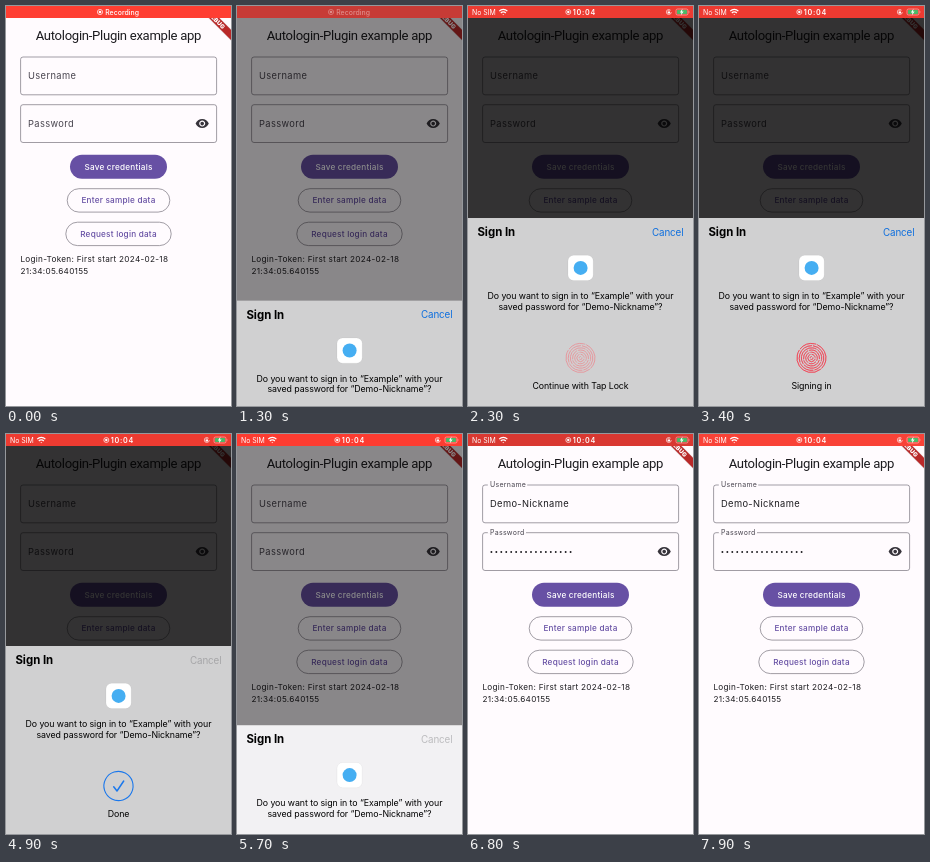
An HTML page that plays this animation: 225x400 px, repeating every 8000 ms.

```html
<!DOCTYPE html>
<html lang="en">
<head>
<meta charset="utf-8">
<title>Autologin demo</title>
<style>
  html, body { margin: 0; width: 100%; height: 100%; overflow: hidden; background: #fffbfe; }
  svg { display: block; width: 100vw; height: 100vh; }
  text { font-family: Inter, "Open Sans", sans-serif; white-space: pre; }
  .mid { text-anchor: middle; }
  .title { font: 13.1px Roboto, sans-serif; letter-spacing: -.29px; fill: #1c1b1f; }
  .field { fill: none; stroke: #79747e; stroke-width: .7; }
  .label { font-size: 9.3px; letter-spacing: .38px; fill: #49454f; }
  .value { font-size: 9.3px; letter-spacing: .38px; fill: #1c1b1f; }
  .btn { font-size: 8.2px; font-weight: 500; letter-spacing: .22px; fill: #6750a4; }
  .line { fill: none; stroke: #79747e; stroke-width: .7; }
  .token { font-size: 8.2px; letter-spacing: .28px; fill: #1c1b1f; }
  .bar { font-size: 6.9px; fill: #fff; }
  .head { font-size: 11.4px; font-weight: 700; fill: #000; }
  .cancel { font-size: 9.8px; letter-spacing: -.1px; text-anchor: end; }
  .body { font-size: 8.8px; letter-spacing: -.07px; fill: #000; text-anchor: middle; }
  .print circle { fill: none; stroke-width: .85; stroke-linecap: round; }
</style>
</head>
<body>
<svg viewBox="0 0 225 400" preserveAspectRatio="none">
  <rect width="225" height="400" fill="#fffbfe"/>
  <text class="title mid" x="112.4" y="34.4">Autologin-Plugin example app</text>

  <rect class="field" x="14.6" y="51" width="196" height="37.8" rx="2.4"/>
  <rect class="field" x="14.6" y="98.7" width="196" height="37.8" rx="2.4"/>
  <g id="notches" fill="#fffbfe">
    <rect x="19.8" y="50" width="39.4" height="2"/>
    <rect x="19.8" y="97.7" width="38.2" height="2"/>
  </g>
  <text class="label" id="userLabel">Username</text>
  <text class="label" id="passLabel">Password</text>
  <g id="values">
    <text class="value" x="22" y="73.3">Demo-Nickname</text>
    <g id="dots" fill="#1c1b1f"></g>
  </g>
  <path transform="translate(189 110.4) scale(.6)" fill="#37343b" d="M12 4.5C7 4.5 2.73 7.61 1 12c1.73 4.39 6 7.5 11 7.5s9.27-3.11 11-7.5c-1.73-4.39-6-7.5-11-7.5zM12 17c-2.76 0-5-2.24-5-5s2.24-5 5-5 5 2.24 5 5-2.24 5-5 5zm0-8c-1.66 0-3 1.34-3 3s1.34 3 3 3 3-1.34 3-3-1.34-3-3-3z"/>

  <rect x="64" y="148.8" width="97" height="24" rx="12" fill="#6750a4"/>
  <text class="btn mid" x="112.5" y="163.8" style="fill:#fff">Save credentials</text>
  <rect class="line" x="61.2" y="182.7" width="102.6" height="23.4" rx="11.7"/>
  <text class="btn mid" x="112.5" y="197.4">Enter sample data</text>
  <rect id="ripple" x="59.8" y="216.2" width="105.4" height="23.4" rx="11.7" fill="#6750a4"/>
  <rect class="line" x="59.8" y="216.2" width="105.4" height="23.4" rx="11.7"/>
  <text class="btn mid" x="112.5" y="230.9">Request login data</text>
  <text class="token" x="14.4" y="256">Login-Token: First start 2024-02-18</text>
  <text class="token" x="14.4" y="268">21:34:05.640155</text>

  <g transform="translate(225 0) rotate(45)">
    <rect x="-25" y="16.4" width="50" height="8.2" fill="#000" opacity=".15"/>
    <rect x="-25" y="16.8" width="50" height="7.2" fill="#b71c1c" opacity=".93"/>
    <text class="mid" y="22.6" font-size="6" font-weight="900" fill="#fff">DEBUG</text>
  </g>

  <rect id="dim" width="225" height="400"/>

  <rect id="bar" width="225" height="12"/>
  <g id="recording">
    <circle cx="94" cy="6" r="2.6" fill="none" stroke="#fff" stroke-width=".7"/>
    <circle cx="94" cy="6" r="1.3" fill="#fff"/>
    <text class="bar" x="99.2" y="8.5" font-weight="500" letter-spacing=".05">Recording</text>
  </g>
  <g id="status">
    <text class="bar" x="4" y="8.5">No SIM</text>
    <g fill="none" stroke="#fff" stroke-width="1.2">
      <path d="M31.2 5.2a5.7 5.7 0 0 1 8.2 0M32.8 7a3.5 3.5 0 0 1 5 0"/>
      <path d="M34.3 8.2h2l-1 1z" fill="#fff" stroke="none"/>
    </g>
    <circle cx="100.3" cy="6" r="2.5" fill="none" stroke="#fff" stroke-width=".7"/>
    <circle cx="100.3" cy="6" r="1.2" fill="#fff"/>
    <text class="bar" x="104.8" y="8.6" style="font-size:7.2px" font-weight="600" letter-spacing=".7">10:04</text>
    <circle cx="200.8" cy="6" r="2.5" fill="none" stroke="#fff" stroke-width=".6" stroke-dasharray="13.5 2.2"/>
    <rect x="199.6" y="5.4" width="2.4" height="2" rx=".3" fill="#fff"/>
    <path d="M200.1 5.5v-.5a.7.7 0 0 1 1.4 0v.5" fill="none" stroke="#fff" stroke-width=".45"/>
    <rect x="208" y="3" width="12" height="6" rx="1.6" fill="none" stroke="#fff" stroke-opacity=".7" stroke-width=".6"/>
    <rect x="209" y="4" width="10" height="4" rx=".8" fill="#4cb866"/>
    <path d="M220.8 5v2a1.1 1.1 0 0 0 0-2z" fill="#fff" opacity=".7"/>
    <path d="M214.6 2.6l-2.7 3.8h1.6l-.7 3 2.8-3.9h-1.7z" fill="#fff"/>
  </g>

  <g id="sheet">
    <rect id="panel" y="212" width="225" height="208"/>
    <text class="head" x="9.4" y="230">Sign In</text>
    <text class="cancel" id="cancel" x="215.5" y="229.6">Cancel</text>
    <rect x="100" y="249.3" width="25.2" height="25.2" rx="5.6" fill="#fff" stroke="#000" stroke-opacity=".1" stroke-width=".4"/>
    <circle cx="112.6" cy="261.9" r="7" fill="#45aef2"/>
    <text class="body" x="112.5" y="293.2">Do you want to sign in to “Example” with your</text>
    <text class="body" x="112.5" y="303.6">saved password for “Demo-Nickname”?</text>
    <g class="print" id="print" transform="translate(112.5 352)">
      <g id="ridges" stroke="#e8949a"></g>
      <g id="redRidges" stroke="#ee4658"></g>
    </g>
    <g transform="translate(112.5 352)" fill="none" stroke="#1b78ec" stroke-linecap="round">
      <circle id="ring" r="14.6" stroke-width="1.1" pathLength="100"/>
      <path id="check" d="M-4.8 .8L-1.5 5L5.2 -5" stroke-width="1.5" stroke-linejoin="round" pathLength="100"/>
    </g>
    <text class="body" id="ask" x="112.5" y="383.2">Continue with Tap Lock</text>
    <text class="body" id="wait" x="112.5" y="383.2">Signing in</text>
    <text class="body" id="done" x="112.5" y="383.2">Done</text>
  </g>
</svg>
<script>
const LOOP = 8000, TRAVEL = 188;
const $ = id => document.getElementById(id);
const set = (id, attrs) => {
  for (const k in attrs) $(id).setAttribute(k, attrs[k]);
};
const clamp = v => Math.min(1, Math.max(0, v));
const ramp = (t, a, b) => clamp((t - a) / (b - a));
const smooth = (t, a, b) => { const p = ramp(t, a, b); return p * p * (3 - 2 * p); };
const mix = (a, b, p) => a + (b - a) * p;
const blend = (a, b, p) => `rgb(${a.map((v, i) => Math.round(mix(v, b[i], p)))})`;

// critically damped spring, 0 to 1
function spring(t, start) {
  const x = Math.max(0, t - start) * 0.0105;
  return 1 - (1 + x) * Math.exp(-x);
}

// pulse of the recording bar: time, colour
const PULSE = [
  [0, [255, 62, 50]], [1500, [196, 59, 54]], [2800, [255, 59, 48]], [4150, [212, 57, 50]],
  [5500, [255, 60, 49]], [6800, [217, 56, 49]], [8000, [250, 66, 55]]
];
function barColour(t) {
  const i = PULSE.findIndex(s => s[0] > t);
  const [a, from] = PULSE[i - 1], [b, to] = PULSE[i];
  return blend(from, to, smooth(t, a, b));
}

// password bullets
$("dots").innerHTML = Array.from({ length: 17 }, (_, i) =>
  `<circle cx="${23.4 + i * 4.95}" cy="118" r=".95"/>`).join("");

// fingerprint: nested rings with uneven breaks
$("ridges").innerHTML = $("redRidges").innerHTML = Array.from({ length: 7 }, (_, i) => {
  const r = 1.5 + i * 2.17;
  return `<circle r="${r}" stroke-dasharray="${r * 1.9} 1.8 ${r * 1.2} 1.8" transform="rotate(${i * 137})"/>`;
}).join("");

function floatLabel(id, base, p) {
  set(id, { transform: `translate(22 ${mix(base, base - 20, p)}) scale(${mix(1, .75, p)})` });
}

function drawPage(t) {
  const filled = smooth(t, 6300, 6470);
  floatLabel("userLabel", 73.3, filled);
  floatLabel("passLabel", 121, filled);
  set("notches", { opacity: filled });
  set("values", { opacity: filled });
  set("ripple", { opacity: .13 * smooth(t, 350, 550) * (1 - smooth(t, 700, 1050)) });
  set("bar", { fill: barColour(t) });
  set("recording", { opacity: 1 - smooth(t, 1150, 1420) });
  set("status", { opacity: smooth(t, 1560, 1850) });
}

function drawSheet(t) {
  const leave = spring(t, 5564), shown = spring(t, 1122) * (1 - leave);
  const light = clamp(leave / .43);
  set("dim", { opacity: .8 * smooth(t, 1080, 1480) * (1 - leave) });
  set("sheet", {
    transform: `translate(0 ${TRAVEL * (1 - shown)})`,
    visibility: shown > .002 ? "visible" : "hidden"
  });
  set("panel", { fill: blend([208, 208, 209], [243, 242, 244], light) });
  set("cancel", { fill: t < 3650 ? "#0f6fde" : blend([166, 166, 168], [188, 188, 190], light) });

  set("print", { opacity: 1 - smooth(t, 3650, 3950) });
  set("redRidges", { opacity: smooth(t, 2300, 3100) });
  const arc = mix(22, 100, smooth(t, 4350, 4700));
  set("ring", {
    opacity: smooth(t, 3750, 4000),
    "stroke-dasharray": arc >= 100 ? "none" : `${arc} 100`,
    transform: `rotate(${(t - 3700) * .36 - 90})`
  });
  const tick = smooth(t, 4550, 4800);
  set("check", { opacity: tick > 0 ? 1 : 0, "stroke-dasharray": `${tick * 100} 200` });

  const signing = smooth(t, 2750, 2950), done = smooth(t, 4620, 4800);
  set("ask", { opacity: 1 - signing });
  set("wait", { opacity: signing * (1 - done) });
  set("done", { opacity: done });
}

const start = performance.now();
function frame() {
  const t = (performance.now() - start) % LOOP;
  drawPage(t);
  drawSheet(t);
  requestAnimationFrame(frame);
}
frame();
</script>
</body>
</html>
```
